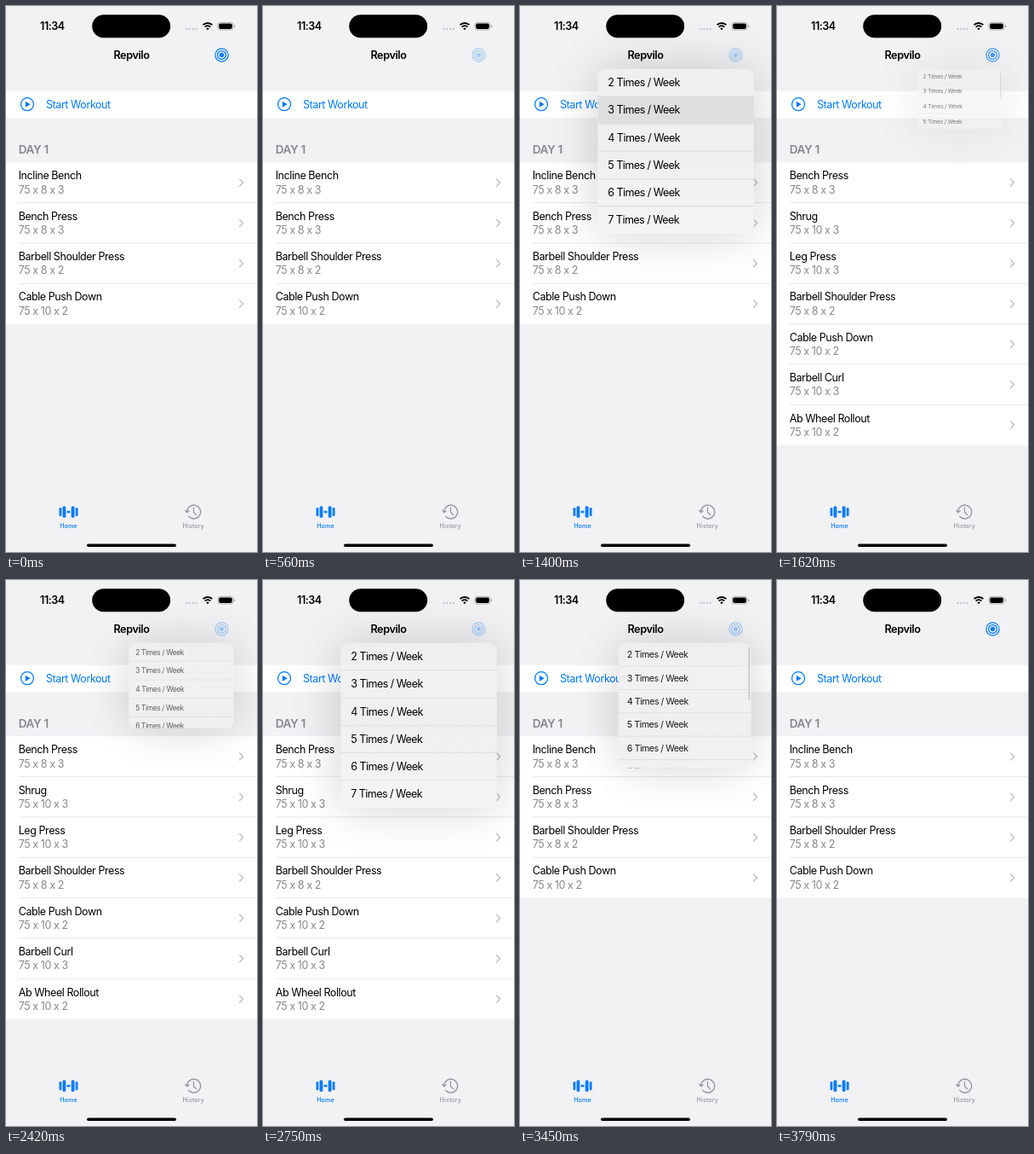
Animation, 295 px wide and 640 px high, one loop 4740 ms. Source, as an HTML page:

```html
<!DOCTYPE html>
<html lang="en">
<head>
<meta charset="utf-8">
<title>Workout planner</title>
<style>
  html, body { margin: 0; width: 100%; height: 100%; overflow: hidden; background: #f2f2f5; }
  svg { display: block; width: 100vw; height: 100vh; }
  text { font: 400 12.5px Inter, Roboto, sans-serif; letter-spacing: -.43px; }
  .semi { font-weight: 600; }
  .sub { fill: #87878b; }
  .blue { fill: #007aff; }
  .line { fill: none; stroke: #007aff; stroke-width: 1.25; }
  .gray { fill: none; stroke: #98989c; stroke-width: 1.3; stroke-linecap: round; stroke-linejoin: round; }
  .sep { stroke: #dfdfe2; stroke-width: .7; }
  .chev { fill: none; stroke: #bfbfc3; stroke-width: 1.4; stroke-linecap: round; stroke-linejoin: round; }
  .tab { font-size: 7.2px; font-weight: 500; letter-spacing: .1px; text-anchor: middle; }
  #rows text { letter-spacing: -.52px; }
</style>
</head>
<body>
<svg viewBox="0 0 295 640">
  <defs>
    <filter id="blur" filterUnits="userSpaceOnUse" x="-60" y="-60" width="460" height="480">
      <feGaussianBlur stdDeviation="29"/>
    </filter>
    <linearGradient id="glass" gradientUnits="userSpaceOnUse" x1="0" y1="73" x2="0" y2="267">
      <stop offset="0" stop-color="#eeeef0"/>
      <stop offset=".22" stop-color="#f1f1f3"/>
      <stop offset=".48" stop-color="#efeff1"/>
      <stop offset="1" stop-color="#f4f4f5"/>
    </linearGradient>
    <clipPath id="clip"><rect class="box"/></clipPath>
  </defs>

  <rect width="295" height="640" fill="#f2f2f5"/>
  <rect y="99.8" width="295" height="31.4" fill="#fff"/>
  <circle class="line" cx="25" cy="115.2" r="7.5"/>
  <path class="blue" d="M22.8 111.7v7l5.9-3.5z"/>
  <text class="blue" x="47" y="119.8">Start Workout</text>
  <text class="semi sub" x="14.7" y="172.8" style="font-size:13.5px;letter-spacing:-.3px">DAY 1</text>
  <g id="list"></g>

  <g class="blue">
    <rect x="62.5" y="588" width="2.8" height="10" rx="1.2"/>
    <rect x="66.5" y="586.3" width="3.8" height="13.4" rx="1.5"/>
    <rect x="71.6" y="591.7" width="3.8" height="2.6" rx=".4"/>
    <rect x="76.7" y="586.3" width="3.8" height="13.4" rx="1.5"/>
    <rect x="81.7" y="588" width="2.8" height="10" rx="1.2"/>
  </g>
  <text class="tab blue" x="73.5" y="612">Home</text>
  <path class="gray" d="M212.7 593a8 8 0 1 1 2 5.3M210.8 591.2l1.9 2.5 2.4-2M220.5 588v5.2l3.2 3.4"/>
  <text class="tab" fill="#98989c" x="220.3" y="612">History</text>
  <rect x="95" y="630.4" width="105" height="3.6" rx="1.8"/>

  <rect x="101.2" y="10.2" width="92" height="27" rx="13.5"/>
  <text class="semi" x="54.4" y="28.3" text-anchor="middle" style="font-size:12.5px">11:34</text>
  <g fill="#b9b9bd" id="dots"></g>
  <g fill="none" stroke="#000" stroke-width="1.9">
    <path d="M231.6 22.2a7.6 7.6 0 0 1 10.8 0M233.7 24.6a4.7 4.7 0 0 1 6.6 0"/>
    <path d="M237 28.2l-1.7-1.8a2.4 2.4 0 0 1 3.4 0z" fill="#000" stroke="none"/>
  </g>
  <rect x="249" y="19.3" width="18" height="8.8" rx="2.8" fill="none" stroke="#a2a2a5" stroke-width=".8"/>
  <rect x="250.2" y="20.5" width="15.6" height="6.4" rx="1.8"/>
  <path d="M268 22.2q1.4.4 1.4 1.5t-1.4 1.5z" fill="#a2a2a5"/>
  <text class="semi" x="147.5" y="62.1" text-anchor="middle" style="font-size:12.7px">Repvilo</text>
  <g id="target">
    <circle class="line" cx="253.5" cy="57.5" r="7.6"/>
    <circle class="line" cx="253.5" cy="57.5" r="4.9"/>
    <circle class="blue" cx="253.5" cy="57.5" r="2.7"/>
  </g>

  <g id="menu">
    <rect class="box" filter="url(#blur)" opacity=".18"/>
    <rect class="box" fill="url(#glass)"/>
    <g clip-path="url(#clip)">
      <g id="rows">
        <rect id="pick" width="184" height="32.2" fill="#dededf"/>
      </g>
    </g>
    <rect id="bar" width="1.5" rx=".75" fill="#c2c2c5"/>
  </g>
</svg>
<script>
const $ = id => document.getElementById(id);
const NS = 'http://www.w3.org/2000/svg';

function add(parent, tag, attrs, text) {
  const el = parent.appendChild(document.createElementNS(NS, tag));
  set(el, attrs);
  if (text) el.textContent = text;
  return el;
}
function set(el, attrs) {
  for (const k in attrs) el.setAttribute(k, attrs[k]);
}

const LOOP = 4740, ROW = 47.35, TOP = 183.2;
const MENU = { x: 91.4, y: 73.7, w: 183.4, row: 32.2, pivot: 253.4 };

const splitPlan = [['Incline Bench', '8 x 3'], ['Bench Press', '8 x 3'],
  ['Barbell Shoulder Press', '8 x 2'], ['Cable Push Down', '10 x 2']];
const fullPlan = [['Bench Press', '8 x 3'], ['Shrug', '10 x 3'], ['Leg Press', '10 x 3'],
  ['Barbell Shoulder Press', '8 x 2'], ['Cable Push Down', '10 x 2'],
  ['Barbell Curl', '10 x 3'], ['Ab Wheel Rollout', '10 x 2']];

// Menu visits: press, open, choose, start closing, gone
const visits = [
  { press: 560, open: 780, choose: 1400, close: 1510, gone: 1850, row: 1 },
  { press: 2190, open: 2420, choose: 3340, close: 3450, gone: 3790, row: 4 }
];
// The screen refreshes only at these moments
const ticks = [0, 560, 780, 900, 1020, 1130, 1400, 1510, 1620, 1730, 1850, 1950,
  2190, 2420, 2530, 2640, 2750, 3340, 3450, 3560, 3670, 3790];

function buildPlan(plan) {
  const g = add($('list'), 'g', {});
  add(g, 'rect', { y: TOP, width: 295, height: ROW * plan.length, fill: '#fff' });
  plan.forEach(([name, sets], i) => {
    const y = TOP + i * ROW;
    if (i) add(g, 'path', { class: 'sep', d: `M15 ${y}H295` });
    add(g, 'text', { x: 14.7, y: y + 20.2 }, name);
    add(g, 'text', { x: 14.7, y: y + 36.4, class: 'sub' }, '75 x ' + sets);
    add(g, 'path', { class: 'chev', d: `M274.6 ${y + 19.7}l4 4.1l-4 4.1` });
  });
  return g;
}

const splitView = buildPlan(splitPlan), fullView = buildPlan(fullPlan);
for (let i = 0; i < 4; i++) add($('dots'), 'circle', { cx: 212.6 + i * 3.7, cy: 27, r: 1.1 });

const labels = add($('rows'), 'g', {});
for (let i = 0; i < 6; i++) {
  const y = i * MENU.row;
  if (i) add($('rows'), 'path', { d: `M0 ${y}H184`, stroke: '#d6d6d9', 'stroke-width': .75 });
  add(labels, 'text', { x: 11.9, y: y + 20.6 }, `${i + 2} Times / Week`);
}
const boxes = document.querySelectorAll('.box');

function drawMenu(s, alpha, ink, row, bar) {
  const x = MENU.pivot - (MENU.pivot - MENU.x) * s;
  const w = MENU.w * s;
  const h = s * (MENU.row * 6 - 139 * (1 - s));
  boxes.forEach(b => set(b, { x, y: MENU.y, width: w, height: h, rx: 9.5 * Math.sqrt(s) }));
  set($('rows'), { transform: `translate(${x} ${MENU.y}) scale(${s})` });
  set($('menu'), { opacity: alpha });
  set(labels, { opacity: ink });
  set($('pick'), { y: row * MENU.row, opacity: row < 0 ? 0 : 1 });
  set($('bar'), { x: x + w - 3, y: MENU.y + 5, height: h * .42, opacity: bar ? 1 : 0 });
}

function draw(time) {
  const t = ticks.filter(k => k <= time).pop();
  const v = visits.find(v => t >= v.press && t < v.gone);
  const full = t >= visits[0].close && t < visits[1].close;
  set(splitView, { visibility: full ? 'hidden' : 'visible' });
  set(fullView, { visibility: full ? 'visible' : 'hidden' });
  const shown = v && t >= v.open;
  set($('menu'), { visibility: shown ? 'visible' : 'hidden' });
  let glow = v ? .32 : 1;
  if (shown && t < v.close) {
    const s = 1 - .326 * Math.exp(-(t - v.open) * .0282);
    drawMenu(s, s < .9 ? .94 : 1, 1 - (1 - s) * 1.07, t >= v.choose ? v.row : -1, false);
  } else if (shown) {
    const c = t - v.close;
    drawMenu(.38 + .47 * Math.exp(-c / 105), .95 * (1 - c / 240), .95, -1, true);
    glow = Math.min(1, .36 + c / 300);
  }
  set($('target'), { opacity: glow });
}

const start = performance.now();
function frame() {
  draw((performance.now() - start) % LOOP);
  requestAnimationFrame(frame);
}
frame();
</script>
</body>
</html>
```
